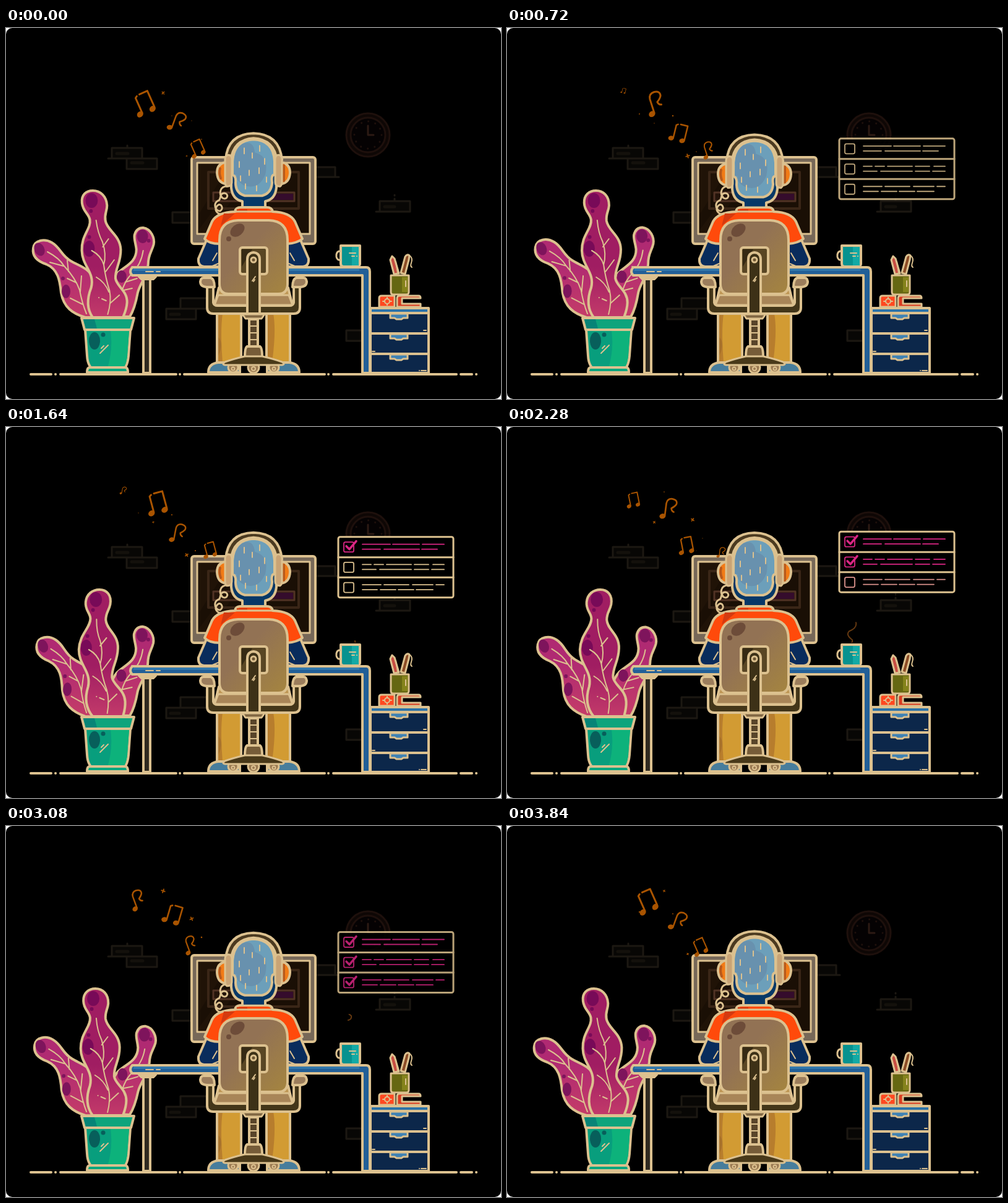
Write an HTML page that moves like this. It is 800 by 600 pixels and loops after 3.88 s.

```html
<!DOCTYPE html>
<html lang="en">
<head>
<meta charset="utf-8">
<title>Desk at night</title>
<style>
html, body { margin: 0; width: 100%; height: 100%; overflow: hidden; background: #fff; }
svg { display: block; width: 800px; height: 600px; }
path, rect, circle, ellipse { stroke-linecap: round; stroke-linejoin: round; }
.o { stroke: #dcc18f; stroke-width: 4; }
.o[stroke-width="3"], .o [stroke-width="3"] { stroke-width: 3; }
.thin { stroke: #dcc18f; stroke-width: 3; }
.l { stroke: #dcc18f; stroke-width: 2; fill: none; }
.brick { fill: #080705; stroke: #1c1812; stroke-width: 3; }
.dim { fill: none; stroke: #1e100c; stroke-width: 3; }
#notes, #sparks { fill: #a95400; stroke: #a95400; }
</style>
</head>
<body>
<svg viewBox="0 0 800 600" fill="none">
<defs>
  <linearGradient id="leaf" x2="0" y2="1"><stop offset=".3" stop-color="#b02a72"/><stop offset="1" stop-color="#c43c68"/></linearGradient>
  <linearGradient id="mid" x2="0" y2="1"><stop offset=".6" stop-color="#a01d62"/><stop offset="1" stop-color="#c23a6a"/></linearGradient>
  <linearGradient id="back" x2="1" y2="1"><stop offset=".4" stop-color="#927254"/><stop offset="1" stop-color="#a5853f"/></linearGradient>
  <clipPath id="steamBox"><path d="M540,304H580V349H540Z"/></clipPath>
  <g id="double" stroke-width="3">
    <path fill="none" d="M-8,14V-12L-5,-14M0,-15H14V13"/>
    <ellipse cx="-12" cy="15" rx="4" ry="3" transform="rotate(-20 -12 15)"/>
    <ellipse cx="10" cy="15" rx="4" ry="3" transform="rotate(-20 10 15)"/>
  </g>
  <g id="single" stroke-width="3">
    <path fill="none" d="M-6,14V-9Q-5,-18 4,-18Q14,-17 12,-9Q10,-5 4,-1Q5,4 9,5"/>
    <ellipse cx="-10" cy="15" rx="4" ry="3" transform="rotate(-20 -10 15)"/>
  </g>
</defs>
<rect width="800" height="600" rx="10" fill="#000"/>

<g class="brick">
  <path d="M171,194H220V211H171ZM195,211H244V228H195ZM165,211H192M196,190V194M490,225H532V241H490ZM532,241H538M604,280H653V297H604ZM598,297H606M628,270V271M628,276V280"/>
  <path d="M269,298H318V315H269ZM282,437H331V454H282ZM259,454H307V471H259ZM277,454H283M550,489H590V506H550Z"/>
  <path d="M179,203H197M203,218H221M612,289H628M266,463H280" stroke-width="5" opacity=".6"/>
</g>
<g class="dim">
  <circle cx="585" cy="173" r="35" fill="#0e0705"/>
  <circle cx="585" cy="173" r="28" fill="#050203"/>
  <circle cx="585" cy="173" r="22" stroke-dasharray=".1 11.42"/>
  <path d="M585,158V173H594" stroke="#2c1a14"/>
</g>

<g id="panel">
  <rect class="thin" x="537" width="186" height="98" rx="3" fill="#000"/>
  <path class="thin" d="M537,33H723M537,65.5H723"/>
</g>
<g clip-path="url(#steamBox)"><path id="steam" stroke="#643810" stroke-width="2" d="M553,35Q559,34 558,28Q547,20 553,14Q566,9 564,0"/></g>

<!-- floor -->
<path class="o" d="M40,560H73M80,560h.1M88,560H275M281,560h.1M288,560H515M521,560h.1M529,560H728M735,560H753M760,560h.1"/>

<!-- plant -->
<g id="right">
  <path class="o" fill="url(#leaf)" d="M162,466C166,440 166,412 180,397C192,385 211,380 211,358C210,348 207,342 208,335C210,327 214,323 222,323C235,325 241,340 239,350C236,362 230,366 230,382C229,402 217,412 213,428C210,444 207,456 200,467Z"/>
  <g fill="#7e145c"><ellipse cx="221" cy="337" rx="9" ry="11"/><ellipse cx="187" cy="402" rx="8" ry="10"/><circle cx="231" cy="344" r="3"/></g>
  <path class="l" d="M222,360Q219,382 203,398Q187,414 183,447M204,397V386M193,411L212,405M186,425L204,421"/>
</g>
<g id="left">
  <path class="o" fill="url(#leaf)" d="M128,468C108,462 93,452 89,428C87,408 84,390 65,382C50,377 42,369 44,356C46,343 62,340 74,347C88,355 89,368 105,377C119,385 134,388 142,406L160,468Z"/>
  <g fill="#7e145c"><ellipse cx="54" cy="358" rx="8" ry="11" transform="rotate(-25 54 358)"/><ellipse cx="97" cy="426" rx="7" ry="11"/><circle cx="92" cy="405" r="3"/></g>
  <path class="l" d="M67,362Q86,372 94,385Q112,404 119,424Q123,445 130,462M71,379L93,385M99,376L101,394M99,405L114,412M122,401L120,427M104,437L124,447"/>
</g>
<g id="middle">
  <path class="o" fill="url(#mid)" d="M140,468C130,455 128,440 135,420C141,395 120,385 120,360C120,335 137,325 136,310C135,300 126,297 126,283C126,270 135,263 146,263C158,263 167,272 166,287C165,297 160,300 161,312C163,328 183,335 183,358C183,380 173,388 174,405C176,418 194,425 194,444C194,455 191,462 189,468Z"/>
  <g fill="#780a58"><ellipse cx="142" cy="279" rx="10" ry="12"/><ellipse cx="132" cy="357" rx="9" ry="13"/><circle cx="139" cy="296" r="3"/><circle cx="133" cy="338" r="3"/></g>
  <path class="l" d="M146,311Q147,331 154,346Q160,366 155,383Q158,405 165,425Q169,442 164,463M164,341L154,354M136,360Q151,368 155,383M172,375L158,394M143,403Q157,411 164,427M181,432L167,445M148,436h.1M153,438L160,441"/>
</g>
<path class="o" fill="#089e7d" d="M128,488H201L198,530Q196,551 187,552H142Q132,548 131,530Z"/>
<path fill="#0db27b" d="M169,490H199L196,530Q194,549 187,550H164Q173,520 169,490Z"/>
<path class="o" fill="#0ea47c" d="M122,469H207L202,488H127Z"/>
<path fill="#078477" d="M125,471H143L147,486H129Z"/>
<path class="o" fill="#08a77d" d="M135,549H193Q197,549 197,557H131Q131,549 135,549Z"/>
<g fill="#075f5b"><ellipse cx="143" cy="506" rx="9" ry="14"/><circle cx="157" cy="496" r="3.5"/></g>
<path class="l" d="M152,526L165,513M154,518L158,514"/>

<!-- desk -->
<path class="o" fill="#302a20" d="M222,405H233V558H222Z"/>
<path class="o" fill="#8a7350" d="M215,402H242L238,406H219Z"/>
<path class="o" fill="#225f97" d="M204,387H582Q588,387 588,394V558H576V400H204Q198,394 204,387Z"/>
<path stroke="#357db0" stroke-width="3" d="M207,391H570"/>
<path class="l" d="M226,394H238M243,394H249"/>

<!-- cabinet, books, pens, mug -->
<path class="o" fill="#0c274a" d="M589,455H683V558H589Z"/>
<path class="o" fill="#2c72a8" d="M589,453H683V461H589Z"/>
<path class="o" d="M589,494H683M589,527H683"/>
<path class="thin" fill="#3f82b4" d="M621,462H649V469H642L639,471H631L628,469H621ZM621,495H649V502H642L639,504H631L628,502H621ZM621,528H649V535H642L639,537H631L628,535H621Z"/>
<path class="l" d="M675,489H679M592,523H596M671,554H679M668,554h.1"/>
<path class="thin" fill="#ff4820" d="M607,433H628V451H603V437Q603,433 607,433Z"/>
<path class="l" d="M609,442H612M620,442H623M616,436V438M616,446V448"/><circle class="l" cx="616" cy="442" r="4"/>
<path class="thin" fill="#d93b20" d="M636,433H667Q670,433 670,437H640V446H670V451H632V437Q632,433 636,433Z"/>
<path class="thin" fill="#c84d42" d="M621,375L624,369L628,373L635,397L627,398Z"/>
<path class="thin" fill="#8d4c26" d="M638,396L645,370Q648,365 652,368L651,375L645,398Z"/>
<path class="l" d="M652,368Q658,372 655,380Q653,385 656,387M630,378L633,396"/>
<path class="thin" fill="#666712" d="M622,400H651V427Q651,431 647,431H626Q622,431 622,427Z"/>
<path fill="#85831c" d="M640,403H649V427H640Z"/><path class="l" d="M646,409V418"/>
<path class="thin" d="M541,361H538Q533,363 534,370Q535,376 541,375"/>
<path class="o" fill="#07928f" d="M541,352H572V382Q571,386 567,386H546Q541,386 541,381Z"/>
<path fill="#13aaa5" d="M559,354H570V384H559Z"/><path class="l" d="M555,364H565M559,369H563M567,369h.1"/>

<!-- monitor -->
<rect class="o" x="300" y="209" width="200" height="140" rx="4" fill="#776858"/>
<path class="thin" fill="#1a0f05" d="M309,218H491V333H309Z"/>
<path fill="#2a1a0b" opacity=".4" d="M311,220H363L311,302ZM311,327L390,220H410L325,331H311Z"/>
<path stroke="#3a2617" stroke-width="4" d="M327,233H473V292H327Z"/>
<path fill="#24140a" stroke="#513325" stroke-width="3" d="M335,266H466V280H335Z"/>
<path fill="#350c2c" d="M430,268H464V278H430Z"/>

<g id="sparks"></g>
<g id="notes"></g>

<!-- sitter -->
<path class="thin" d="M357,256C346,256 343,268 350,275C358,279 361,268 353,267C344,267 348,279 343,279C334,284 338,296 346,296C353,292 347,282 342,287C337,292 338,298 346,301"/>
<path class="o" fill="#d29b33" d="M341,455H380V543H341ZM421,455H459V543H421Z"/>
<path fill="#b77d2d" d="M343,462H350Q346,490 350,541H343ZM423,462H432Q437,490 430,541H423Z"/>
<path fill="#9f6a2b" opacity=".6" d="M343,500Q353,510 343,530Z"/>
<path class="o" fill="#477d9c" d="M327,557Q327,543 343,541H378V557ZM422,557V541H458Q474,543 474,557Z"/>
<path class="o" fill="#092c5c" d="M324,343L311,373Q310,385 320,386H345V345ZM476,343L489,373Q490,385 480,386H455V345Z"/>
<path class="l" d="M334,376L341,364M466,376L459,364M331,386L343,381M469,386L457,381"/>
<path class="o" fill="#073867" d="M382,278H419V292H382Z"/>
<path class="o" fill="#ff4a0b" d="M370,297Q371,290 380,290H421Q430,290 431,297Q459,298 467,313L479,341Q470,348 455,349H345Q328,349 321,341L333,313Q341,298 370,297Z"/>
<path fill="#d43a10" d="M373,293H390V299H373ZM352,300H370L347,320Z"/>
<path class="thin" d="M371,297H430"/>

<g id="head">
  <path class="o" fill="#073867" d="M382,285V279Q366,276 364,257V235H437V257Q435,276 419,279V285"/>
  <path class="o" fill="#4b3a20" d="M355,212Q358,170 400,169Q442,170 446,212L438,214Q434,179 400,177Q367,179 363,214Z"/>
  <path class="o" fill="#6c9fba" d="M366,214Q369,180 400,179Q432,180 434,214V236Q428,236 430,249Q429,266 414,270H386Q371,266 371,249Q372,238 366,236Z"/>
  <path fill="#668aa8" d="M369,220Q367,196 382,186Q400,179 402,200Q426,206 419,236Q408,262 384,253Q370,245 373,236H368Z" opacity=".65"/>
  <path class="l" d="M385,193V202M410,189V198M398,201V209M377,215V224M418,210V219M393,229V237M409,225V234M379,238V246M421,240V248M387,251V259M405,254V262"/>
  <path class="o" fill="#f27b16" d="M355,216Q341,218 341,233Q342,249 355,251ZM445,216Q459,218 459,233Q458,249 445,251Z"/>
  <path stroke="#b85a1c" stroke-width="4" d="M346,226Q344,233 347,242M449,221V246"/>
  <path class="thin" fill="#c9a476" d="M359,204Q365,204 365,211V248Q365,255 357,255Q354,253 354,248V211Q354,205 359,204ZM441,204Q435,204 435,211V248Q435,255 443,255Q446,253 446,248V211Q446,205 441,204Z"/>
</g>

<!-- chair -->
<path class="o" fill="#bd9553" d="M344,420H456L463,449H337Z"/>
<path class="o" fill="url(#back)" d="M375,311H425Q455,312 455,343V414Q455,430 440,430H360Q345,430 345,414V343Q345,312 375,311Z"/>
<g fill="#6d4c39"><ellipse cx="374" cy="327" rx="13" ry="9" transform="rotate(-40 374 327)"/><circle cx="360" cy="341" r="4"/></g>
<path class="thin" fill="#a88558" d="M343,432H457L463,448H337Z"/>
<path class="o" fill="#433619" d="M325,418H335V444Q336,449 342,449H458Q464,449 465,444V418H475V452Q475,462 465,462H335Q325,462 325,452Z"/>
<path class="o" fill="#9b7d5c" d="M319,404H331Q337,406 337,419H324Q314,418 314,410Q315,404 319,404ZM481,404H469Q463,406 463,419H476Q486,418 486,410Q485,404 481,404Z"/>
<rect class="o" x="378" y="355" width="44" height="43" rx="4" fill="#594624"/>
<path fill="#362a14" d="M381,358H398L381,386Z"/>
<path class="o" fill="#3d3117" d="M390,462V374Q390,364 400,363Q410,364 410,374V462Z"/>
<circle class="thin" cx="400" cy="375" r="4" fill="#6d5633"/>
<path class="l" d="M398,409L403,402M400,410L402,407"/>
<path class="thin" fill="#816743" d="M382,463H418L413,470H387Z"/>
<path class="o" fill="#59452a" d="M393,471H407V516H393Z"/>
<path class="l" d="M395,482H405M395,493H405M395,504H405"/>
<path class="o" fill="#765c38" d="M390,515H410Q414,516 414,532H386Q386,516 390,515Z"/>
<g class="thin" fill="#9b7a52">
  <circle cx="367" cy="549" r="8"/><circle cx="433" cy="549" r="8"/><circle cx="400" cy="549" r="9"/>
  <path fill="#493919" d="M386,531H414Q432,535 446,540Q452,544 446,545H354Q348,544 354,540Q368,535 386,531Z"/>
</g>
<g class="l"><circle cx="367" cy="551" r="2.5"/><circle cx="433" cy="551" r="2.5"/><circle cx="400" cy="551" r="3"/></g>
</svg>

<script>
const LOOP = 3880, BEAT = LOOP / 4;
const $ = id => document.getElementById(id);
const add = (parent, tag, attrs) => {
  const el = document.createElementNS('http://www.w3.org/2000/svg', tag);
  for (const k in attrs) el.setAttribute(k, attrs[k]);
  return parent.appendChild(el);
};
const set = (el, value, name = 'transform') => el.setAttribute(name, value);
const clamp = v => Math.max(0, Math.min(1, v));
const wave = turns => Math.cos(turns * 2 * Math.PI);
const mod = (a, n) => (a % n + n) % n;

// To-do rows: dashed lines, box and tick
const lines = [
  ['M576,12H621M625,12H668M673,12H708', 'M576,20H605M611,20H668M672,20H697'],
  ['M576,12H590M595,12H610M615,12H655M660,12H683M690,12H708', 'M576,20H598M604,20H655M660,20H683M688,20H708'],
  ['M576,12H606M611,12H651M657,12H690M695,12H708', 'M576,20H600M605,20H630M634,20H659M663,20H690']
];
const rows = lines.map((d, i) => {
  const g = add($('panel'), 'g', { transform: `translate(0 ${i * 32.7})`, 'stroke-width': 1.8 });
  add(g, 'path', { d: d.join('') });
  add(g, 'rect', { x: 546, y: 8.5, width: 16, height: 16, rx: 2.5 });
  const tick = add(g, 'path', { d: 'M550,15L555,20L566,7', pathLength: 1, 'stroke-dasharray': '1 2', 'stroke-width': 3.5 });
  return { g, tick };
});

// Notes drift along age, x, y, scale
const drift = [
  [0, 348, 213, 0], [170, 347, 203, .45], [500, 329, 198, .68], [880, 303, 193, .74],
  [1140, 289, 191, .76], [1490, 278, 171, .83], [1800, 277, 150, .87], [2120, 262, 132, .9],
  [2450, 243, 122, 1], [2760, 221, 121, 1], [3070, 204, 118, .68], [3440, 189, 102, .32], [3570, 186, 98, 0]
];
const notes = [0, 1, 2, 3].map(i => add($('notes'), 'use', { href: i % 2 ? '#double' : '#single' }));
function placeNote(el, age) {
  const i = drift.findIndex(k => k[0] > age);
  if (i < 0) return set(el, 'scale(0)');
  const a = drift[i - 1], b = drift[i], u = (age - a[0]) / (b[0] - a[0]);
  const [, x, y, s] = a.map((v, j) => v + (b[j] - v) * u);
  set(el, `translate(${x} ${y}) rotate(${-2 - 22 * wave((age - 800) / 1940)}) scale(${s})`);
}

// x, y, phase of the peak, size
const sparks = [
  [254, 105, .12, 1], [300, 150, .25, 1], [238, 154, .5, 1], [292, 207, .79, 1],
  [316, 180, .16, 0], [214, 139, .88, 0], [268, 142, .82, 0], [306, 200, .57, 0]
].map(([x, y, peak, star]) => ({ x, y, peak, el: star
  ? add($('sparks'), 'path', { d: 'M-3,0H3M0,-3V3', 'stroke-width': 2 })
  : add($('sparks'), 'circle', { r: 1.3, stroke: 'none' }) }));

// The middle leaf bends: the tip and the belly move in opposite ways
const bend = y => { const u = (468 - y) / 200; return u * (21 * u - 16); };
const bendable = [...$('middle').querySelectorAll('path')].map(el => ({ el, d: el.getAttribute('d') }));
const spots = [...$('middle').querySelectorAll('ellipse, circle')];

function draw(t) {
  const turn = t / LOOP, beat = t / BEAT;

  set($('head'), `translate(0 ${2.6 - 1.4 * wave(turn * 2)})`);

  const sway = -wave(turn);
  for (const { el, d } of bendable)
    set(el, d.replace(/([\d.]+),([\d.]+)/g, (_, x, y) => `${(+x + sway * bend(+y)).toFixed(2)},${y}`), 'd');
  for (const el of spots) set(el, `translate(${sway * bend(+el.getAttribute('cy'))})`);
  set($('left'), `rotate(${1.6 * (1 + sway)} 130 465)`);
  set($('right'), `rotate(${-1.4 * wave((t - 900) / LOOP)} 195 460)`);

  set($('panel'), `translate(0 ${174.4 + 5.3 * wave(beat - .835)})`);
  set($('panel'), Math.min(clamp((t - 240) / 560), clamp((3520 - t) / 520)), 'opacity');
  rows.forEach(({ g, tick }, i) => {
    const p = clamp((t - 1160 - 500 * i) / 400), done = clamp(p * 2 - 1);
    const mix = (a, b) => Math.round(a + (b - a) * p);
    set(g, `rgb(${mix(220, 218)},${mix(193, 38)},${mix(143, 132)})`, 'stroke');
    set(tick, 1 - done, 'stroke-dashoffset');
    set(tick, done ? 1 : 0, 'opacity');
  });

  set($('steam'), `translate(0 ${346 - .0465 * (t - 1640)})`);
  notes.forEach((el, i) => placeNote(el, mod(t - 160 - i * BEAT, LOOP)));
  for (const { x, y, peak, el } of sparks) {
    const size = Math.max(0, .15 + .85 * wave(beat - peak));
    set(el, `translate(${x} ${y}) rotate(${(beat - peak) * 360}) scale(${size})`);
  }
}

function tick() {
  draw(performance.now() % LOOP);
  requestAnimationFrame(tick);
}
tick();
</script>
</body>
</html>
```
